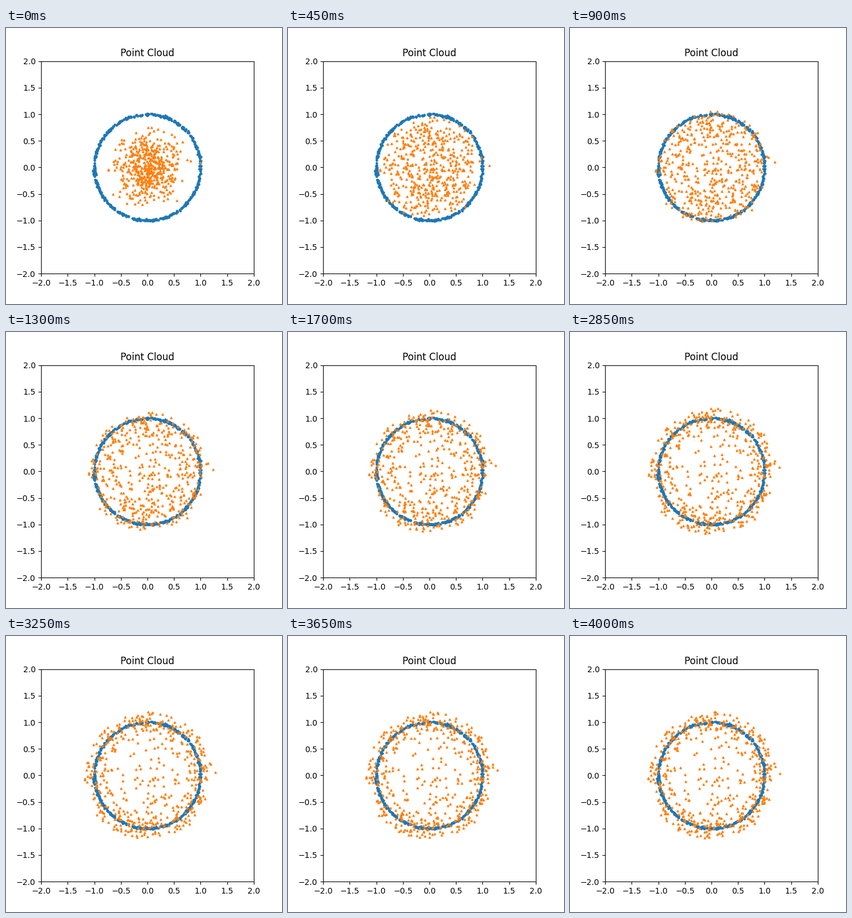
A matplotlib script that plays this animation: 480 px wide and 480 px high, repeating every 4050 ms.

```python
import numpy as np
import matplotlib.pyplot as plt
from matplotlib.animation import FuncAnimation

N = 500
FRAMES = 81
STEP_MS = 50
SIGMA = 0.3

rng = np.random.default_rng(7)


def polar(r, a):
    return np.column_stack((r * np.cos(a), r * np.sin(a)))


# Fixed noisy ring
ring = polar(np.ones(N), rng.uniform(0, 2 * np.pi, N))
ring += rng.normal(0, 0.01, (N, 2))

# Gaussian cloud in polar form; u is the radial quantile of each point
u = rng.uniform(0, 0.985, N)
angle = rng.uniform(0, 2 * np.pi, N)
u[0], angle[0] = 0.996, 0.09  # lone outlier on the right
r_start = SIGMA * np.sqrt(-2 * np.log(1 - u))
r_end = np.interp(
    u,
    [0, 0.06, 0.2, 0.32, 0.55, 0.8, 0.95, 0.985, 0.996],
    [0.12, 0.54, 0.83, 0.92, 1.01, 1.11, 1.19, 1.225, 1.285],
)
tau = 0.78 + 1.2 * (1 - u) ** 3  # inner points settle more slowly

# Small sideways wobble of each point
freq = rng.uniform(2, 9, (2, N))
phase = rng.uniform(0, 2 * np.pi, (2, N))


def cloud_at(t):
    r = r_start + (r_end - r_start) * (1 - np.exp(-t / tau))
    wobble = (np.sin(freq * t + phase) - np.sin(phase)).sum(axis=0)
    return polar(r, angle + 0.018 * wobble)


fig, ax = plt.subplots(figsize=(4.8, 4.8), dpi=100)
ax.set_aspect("equal")
ax.set_xlim(-2, 2)
ax.set_ylim(-2, 2)
ticks = np.arange(-2, 2.1, 0.5)
ax.set_xticks(ticks)
ax.set_yticks(ticks)
ax.set_title("Point Cloud")

ax.scatter(*ring.T, s=5, marker="o", color="C0")
cloud = ax.scatter(*cloud_at(0).T, s=5, marker="^", color="C1")


def update(i):
    cloud.set_offsets(cloud_at(i * STEP_MS / 1000))
    return (cloud,)


anim = FuncAnimation(fig, update, frames=FRAMES, interval=STEP_MS,
                     repeat=True, repeat_delay=0)
plt.show()
```
